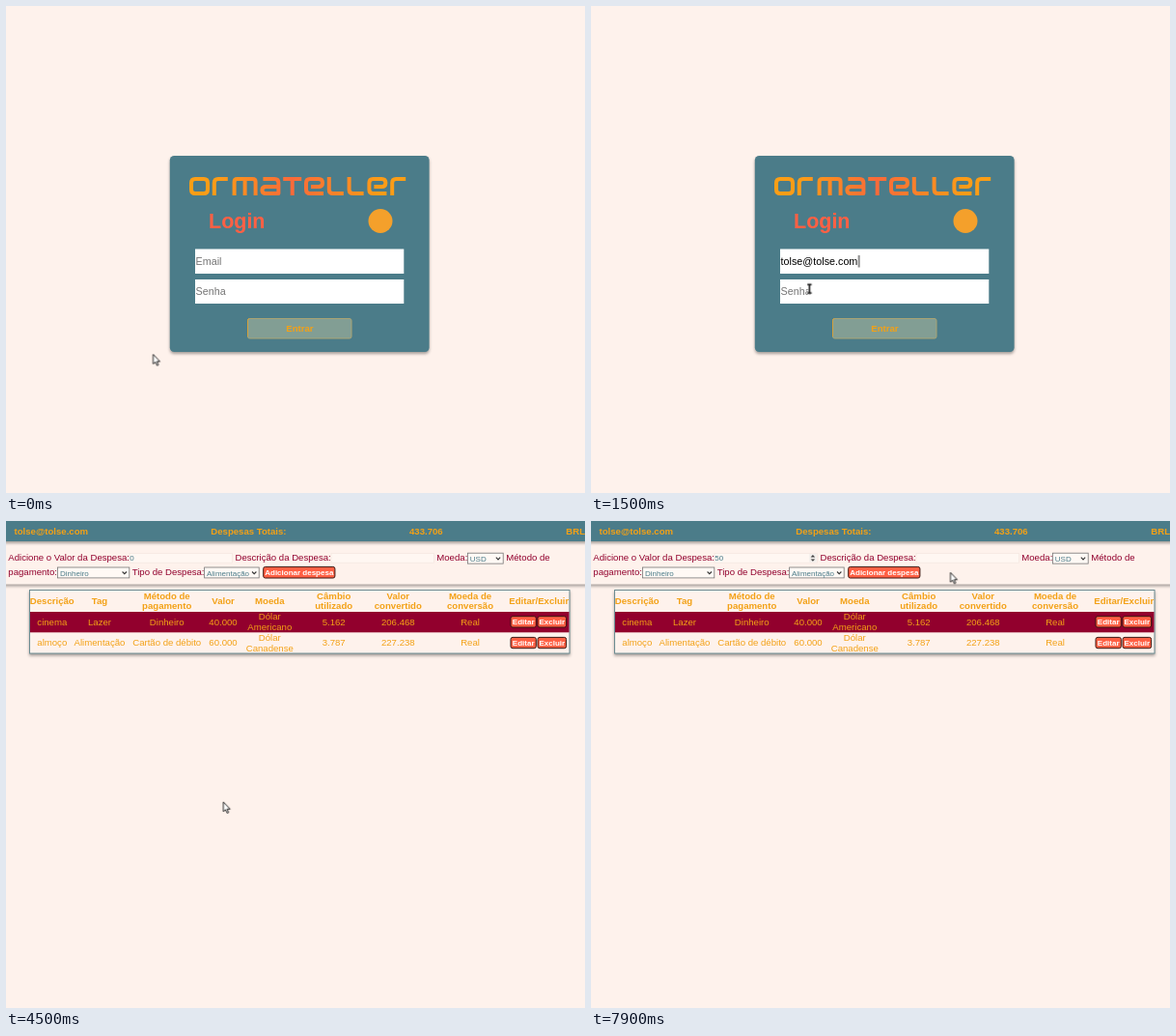
Recreate the animation shown at these times as an HTML page. Size 600 by 504 pixels, loop 8000 ms.

```html
<!DOCTYPE html>
<html lang="pt-BR">
<head>
<meta charset="utf-8">
<title>OrmaTeller</title>
<style>
  :root { --paper: #fef2ec; --teal: #4b7c89; --orange: #f3a116; --tomato: #ff6044; --wine: #92002d; }
  html, body { margin: 0; width: 100%; height: 100%; overflow: hidden; background: var(--paper); }
  svg { display: block; width: 600px; height: 504px; font: 9.6px "Liberation Sans", Arial, sans-serif; }
  .bold { font-weight: 700; }
  .mid { text-anchor: middle; }
  .orange { fill: var(--orange); }
  .wine { fill: var(--wine); }
  .teal { fill: var(--teal); }
  .field { font-size: 10.77px; }
  .hint { fill: #757575; }
  .small { font-size: 8px; }
  .list { font: 8.2px "Open Sans", "Noto Sans", sans-serif; fill: #222; }
  .shadow { filter: drop-shadow(0 2px 1.5px rgba(0, 0, 0, .35)); }
  .select { fill: #fff9f5; stroke: #767676; stroke-width: .8; }
  .input { fill: #fff7f2; stroke: #f5e8e1; stroke-width: .8; }
  .push { fill: var(--tomato); stroke: #3a1712; }
  .glyphs { fill: none; stroke: #fff; stroke-width: 4; stroke-linejoin: round; }

  /* One loop is 8 s; 1.25% is one 100 ms step. */
  .anim { animation: 8s step-end infinite; }
  #login { animation-name: login; }
  #dash { animation-name: dash; }
  #popup { animation-name: popup; }
  #mail-hint { animation-name: until-picked; }
  #mail-value { animation-name: from-picked; }
  #mail-caret { animation-name: mail-caret; }
  #pass-hint { animation-name: pass-hint; }
  #pass-cover { animation-name: pass-type; }
  #pass-caret { animation-name: pass-caret; }
  #enter-off { animation-name: enter-off; }
  #enter-on { animation-name: enter-on; }
  #spinner { animation-name: spinner; }
  #marked { animation-name: marked; }
  #zero { animation-name: zero; }
  #five { animation-name: five; }
  #fifty { animation-name: fifty; }
  #pointer { animation-name: pointer; }
  #arrow { animation-name: arrow; }
  #ibeam { animation-name: ibeam; }

  @keyframes login { 0% { opacity: 1 } 56.25%, to { opacity: 0 } }
  @keyframes dash { 0% { opacity: 0 } 56.25%, to { opacity: 1 } }
  @keyframes popup { 0%, 16.25%, to { opacity: 0 } 7.5% { opacity: 1 } }
  @keyframes until-picked { 0% { opacity: 1 } 16.25%, to { opacity: 0 } }
  @keyframes from-picked { 0% { opacity: 0 } 16.25%, to { opacity: 1 } }
  @keyframes mail-caret {
    0% { opacity: 0; transform: none }
    7.5% { opacity: 1; transform: none }
    16.25% { opacity: 1; transform: translateX(80.6px) }
    22.5%, to { opacity: 0; transform: translateX(80.6px) }
  }
  @keyframes pass-hint { 0% { opacity: 1 } 28.75%, to { opacity: 0 } }
  @keyframes pass-caret { 0%, 55%, to { opacity: 0 } 22.5% { opacity: 1 } }
  @keyframes pass-type {
    0% { transform: none }
    28.75% { transform: translateX(3.77px) }
    32.5% { transform: translateX(7.54px) }
    35% { transform: translateX(11.31px) }
    38.75% { transform: translateX(15.08px) }
    41.25% { transform: translateX(18.85px) }
    43.75% { transform: translateX(22.62px) }
    46.25%, to { transform: translateX(26.39px) }
  }
  @keyframes enter-off { 0% { opacity: 1 } 43.75%, to { opacity: 0 } }
  @keyframes enter-on { 0% { opacity: 0 } 43.75%, to { opacity: 1 } }
  @keyframes spinner { 0% { opacity: 0 } 72.5%, to { opacity: 1 } }
  @keyframes marked { 0%, 88.75%, to { opacity: 0 } 77.5% { opacity: 1 } }
  @keyframes zero { 0% { opacity: 1 } 88.75%, to { opacity: 0 } }
  @keyframes five { 0% { opacity: 0 } 88.75%, to { opacity: 1 } }
  @keyframes fifty { 0% { opacity: 0 } 91.25%, to { opacity: 1 } }
  @keyframes arrow { 0%, 12.5%, 56.25%, 97.5%, to { opacity: 1 } 5%, 17.5%, 72.5% { opacity: 0 } }
  @keyframes ibeam { 0%, 12.5%, 56.25%, 97.5%, to { opacity: 0 } 5%, 17.5%, 72.5% { opacity: 1 } }
  @keyframes pointer {
    0% { transform: translate(152.5px, 360.5px); animation-timing-function: steps(5) }
    6.25% { transform: translate(237.5px, 263.5px) }
    11.25% { transform: translate(237.5px, 263.5px); animation-timing-function: steps(4) }
    16.25% { transform: translate(300px, 295px); animation-timing-function: steps(2) }
    18.75% { transform: translate(225.2px, 290.7px) }
    61.25% { transform: translate(225.2px, 290.7px); animation-timing-function: steps(4) }
    66.25% { transform: translate(140px, 265px); animation-timing-function: steps(2) }
    68.75% { transform: translate(72px, 120px); animation-timing-function: steps(2) }
    71.25% { transform: translate(64px, 45px) }
    72.5% { transform: translate(149.2px, 32.7px) }
    75% { transform: translate(149.2px, 32.7px); animation-timing-function: steps(4) }
    80% { transform: translate(121px, 33px) }
    96.25% { transform: translate(121px, 33px); animation-timing-function: steps(2) }
    98.75%, to { transform: translate(372.5px, 53.3px) }
  }
</style>
</head>
<body>
<svg viewBox="0 0 600 504">
  <defs>
    <linearGradient id="glow">
      <stop offset="0" stop-color="#fb9f15"/>
      <stop offset=".15" stop-color="#fb9b18"/>
      <stop offset=".47" stop-color="#f96a3a"/>
      <stop offset=".85" stop-color="#fb9b18"/>
      <stop offset="1" stop-color="#fb9f15"/>
    </linearGradient>
    <path id="o" d="M4 0H13Q17 0 17 4V11Q17 15 13 15H4Q0 15 0 11V4Q0 0 4 0Z"/>
    <path id="r" d="M0 17V4Q0 0 4 0H14"/>
    <path id="m" d="M0 17V3Q0 0 3 0H19Q22 0 22 3V17M11 0V17"/>
    <path id="a" d="M1 0H13Q17 0 17 4V15H4Q0 15 0 11.5Q0 8 4 8H17"/>
    <path id="t" d="M-2 0H17M7.5 0V17"/>
    <path id="e" d="M18 15H4Q0 15 0 11V4Q0 0 4 0H13Q17 0 17 4Q17 8 13 8H5"/>
    <path id="l" d="M0 -2V11Q0 15 4 15H15"/>
    <mask id="title" maskUnits="userSpaceOnUse" x="186" y="172" width="234" height="28">
      <g class="glyphs">
        <use href="#o" x="192" y="179"/><use href="#r" x="215.8" y="179"/>
        <use href="#m" x="236.6" y="179"/><use href="#a" x="265.4" y="179"/>
        <use href="#t" x="289.2" y="179"/><use href="#e" x="311" y="179"/>
        <use href="#l" x="334.8" y="179"/><use href="#l" x="355.6" y="179"/>
        <use href="#e" x="376.4" y="179"/><use href="#r" x="400.2" y="179"/>
      </g>
    </mask>
    <path id="chevron" d="M-2.2 -1.1L0 1.1L2.2 -1.1" fill="none" stroke="#333" stroke-width="1.1"/>
    <g id="actions">
      <rect class="push" x="523" y="98.7" width="26.3" height="11.3" rx="2"/>
      <rect class="push" x="551" y="98.7" width="29.6" height="11.3" rx="2"/>
      <g class="small bold mid" fill="#fff">
        <text x="536.2" y="107.2">Editar</text>
        <text x="565.8" y="107.2">Excluir</text>
      </g>
    </g>
  </defs>

  <g id="login" class="anim">
    <rect class="teal shadow" x="169.8" y="155" width="268.8" height="203" rx="4.5"/>
    <rect x="186" y="172" width="234" height="28" fill="url(#glow)" mask="url(#title)" role="img" aria-label="OrmaTeller"/>
    <text class="bold" x="210" y="230" font-size="21.5" fill="#ff6044">Login</text>
    <circle cx="388" cy="222.5" r="12.5" fill="#f4a02b"/>

    <g fill="#fff">
      <rect x="196" y="251.5" width="216.3" height="25.5"/>
      <rect x="196" y="283" width="216.3" height="25"/>
    </g>
    <g class="field">
      <text id="mail-hint" class="anim hint" x="196.6" y="268">Email</text>
      <text id="mail-value" class="anim" x="196.6" y="268">tolse@tolse.com</text>
      <rect id="mail-caret" class="anim" x="196.6" y="258" width=".9" height="12.5"/>
      <text x="196.6" y="298.6">•••••••</text>
      <g id="pass-cover" class="anim">
        <rect x="196.6" y="288" width="28" height="14" fill="#fff"/>
        <rect id="pass-caret" class="anim" x="196.6" y="289" width=".9" height="12.5"/>
      </g>
      <text id="pass-hint" class="anim hint" x="196.6" y="298.6">Senha</text>
    </g>

    <g id="enter-off" class="anim">
      <rect x="250.5" y="323.5" width="107.5" height="20.5" rx="2" fill="#829e94" stroke="#a9a474"/>
      <path d="M250.5 342V325.5Q250.5 323.5 252.5 323.5" fill="none" stroke="#d5a13b"/>
      <text class="bold mid orange" x="304.4" y="337">Entrar</text>
    </g>
    <g id="enter-on" class="anim">
      <rect class="teal shadow" x="250.5" y="323.5" width="107.5" height="20.5" rx="2" stroke="#53514f"/>
      <path d="M250.5 342.5V325.5Q250.5 323.5 252.5 323.5" fill="none" stroke="#e8644e"/>
      <path d="M252.5 323.5H356.5" stroke="#87776f"/>
      <text class="bold mid" x="304.4" y="337" fill="#ff6044">Entrar</text>
    </g>

    <g id="popup" class="anim">
      <path d="M257 282.5H262L268 277.5L274 282.5H375.5Q377.5 282.5 377.5 284.5V393Q377.5 395 375.5 395H257Q255 395 255 393V284.5Q255 282.5 257 282.5Z"
        fill="#fffefd" stroke="#ccc6c2" stroke-width=".7" filter="drop-shadow(0 1px 1px rgba(0,0,0,.25))"/>
      <g class="list">
        <text x="262.3" y="298.6">tolse@tolse.com</text>
        <text x="262.3" y="320">fghfgh</text>
        <text x="262.3" y="341.5">lago_tirelo@mokfeil.com</text>
        <text x="262.3" y="363">tolse@tolse.c</text>
        <text x="262.3" y="384.5">lago_tirelo@zumel.com</text>
      </g>
    </g>
  </g>

  <g id="dash" class="anim">
    <rect class="shadow" x="-5" y="-5" width="610" height="70.5" fill="#fef2ec"/>
    <rect class="teal shadow" x="-5" y="-5" width="610" height="26"/>
    <g class="bold orange">
      <text x="8.5" y="14">tolse@tolse.com</text>
      <text x="212.3" y="14">Despesas Totais:</text>
      <text x="418" y="14">433.706</text>
      <text x="580.3" y="14">BRL</text>
    </g>

    <g class="wine">
      <text x="2.3" y="41.3">Adicione o Valor da Despesa:</text>
      <text x="237.5" y="41.3">Descrição da Despesa:</text>
      <text x="446.3" y="41.3">Moeda:</text>
      <text x="518.3" y="41.3">Método de</text>
      <text x="2.3" y="56.3">pagamento:</text>
      <text x="130.7" y="56.3">Tipo de Despesa:</text>
    </g>
    <rect class="input" x="128" y="33.4" width="106.5" height="9.8"/>
    <rect class="input" x="337" y="33.4" width="106.5" height="9.8"/>
    <rect class="select" x="478.4" y="33.2" width="36.8" height="10.9"/>
    <rect class="select" x="53.4" y="48" width="74.4" height="10.9"/>
    <rect class="select" x="205.6" y="48" width="56.6" height="10.9"/>
    <use href="#chevron" x="510" y="38.8"/>
    <use href="#chevron" x="122.8" y="53.6"/>
    <use href="#chevron" x="257.2" y="53.6"/>
    <g class="small teal">
      <rect id="marked" class="anim" x="128" y="34" width="4.6" height="8.6" fill="#a9c9f5"/>
      <text id="zero" class="anim" x="128.2" y="41.2">0</text>
      <text id="five" class="anim" x="128.2" y="41.2">5</text>
      <text id="fifty" class="anim" x="132.65" y="41.2">0</text>
      <text x="480.8" y="41.6">USD</text>
      <text x="56" y="56.5">Dinheiro</text>
      <text x="208" y="56.5">Alimentação</text>
    </g>
    <g id="spinner" class="anim">
      <rect x="226.2" y="34" width="7.4" height="8.6" fill="#f3efec"/>
      <path d="M227.6 37.4L229.9 35L232.2 37.4ZM227.6 39.4L229.9 41.8L232.2 39.4Z" fill="#444"/>
    </g>
    <rect class="push" x="266.7" y="47.4" width="74.2" height="11.6" rx="2"/>
    <text class="small bold mid" x="303.8" y="56.1" fill="#fff">Adicionar despesa</text>

    <rect class="shadow" x="24.5" y="71.5" width="559.5" height="65.5" fill="#fef2ec" stroke="#6b8c92"/>
    <rect class="wine" x="25" y="94" width="558.5" height="21.3"/>
    <g class="mid orange">
      <g class="bold">
        <text x="47.8" y="86.2">Descrição</text>
        <text x="97" y="86.2">Tag</text>
        <text x="166.7" y="80.7">Método de</text>
        <text x="166.7" y="91.4">pagamento</text>
        <text x="225" y="86.2">Valor</text>
        <text x="273.3" y="86.2">Moeda</text>
        <text x="339.7" y="80.7">Câmbio</text>
        <text x="339.7" y="91.4">utilizado</text>
        <text x="406.3" y="80.7">Valor</text>
        <text x="406.3" y="91.4">convertido</text>
        <text x="481" y="80.7">Moeda de</text>
        <text x="481" y="91.4">conversão</text>
        <text x="552.3" y="86.2">Editar/Excluir</text>
      </g>
      <text x="47.8" y="107.5">cinema</text>
      <text x="97" y="107.5">Lazer</text>
      <text x="166.7" y="107.5">Dinheiro</text>
      <text x="225" y="107.5">40.000</text>
      <text x="273.3" y="102.2">Dólar</text>
      <text x="273.3" y="113">Americano</text>
      <text x="339.7" y="107.5">5.162</text>
      <text x="406.3" y="107.5">206.468</text>
      <text x="481" y="107.5">Real</text>
      <text x="47.8" y="129.2">almoço</text>
      <text x="97" y="129.2">Alimentação</text>
      <text x="166.7" y="129.2">Cartão de débito</text>
      <text x="225" y="129.2">60.000</text>
      <text x="273.3" y="123.8">Dólar</text>
      <text x="273.3" y="134.6">Canadense</text>
      <text x="339.7" y="129.2">3.787</text>
      <text x="406.3" y="129.2">227.238</text>
      <text x="481" y="129.2">Real</text>
    </g>
    <use href="#actions"/>
    <use href="#actions" y="21.7"/>
  </g>

  <g id="pointer" class="anim">
    <path id="arrow" class="anim" d="M0 0V10L2.3 8L4 11.6L5.5 10.9L3.9 7.4H7Z" fill="#fff" stroke="#111" stroke-width=".9"/>
    <g id="ibeam" class="anim" fill="none">
      <path d="M-.9 -2.4H3.3M1.2 -2.4V6.2M-.9 6.2H3.3" stroke="#ddd" stroke-width="3"/>
      <path d="M-1 -2.4H3.4M1.2 -2.4V6.2M-1 6.2H3.4" stroke="#222" stroke-width="1.5"/>
    </g>
  </g>
</svg>
</body>
</html>
```
